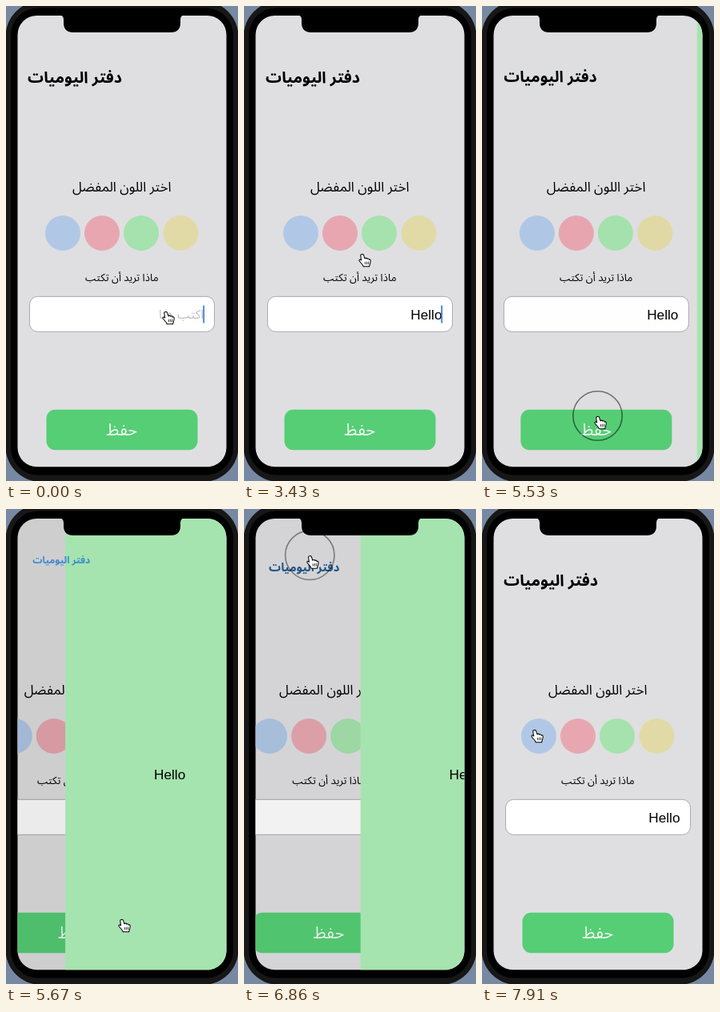
An HTML page for the animation above (8000 ms loop, 290 px wide and 594 px high).

```html
<!DOCTYPE html>
<html lang="ar">
<head>
<meta charset="utf-8">
<title>دفتر اليوميات</title>
<style>
  html, body { margin: 0; width: 100%; height: 100%; overflow: hidden; background: #7788a2; }
  svg { display: block; width: 290px; height: 594px; --k: 1; --kb: 1; }
  .ar { font-family: "Noto Sans Arabic", "Noto Sans", "DejaVu Sans", sans-serif; font-weight: 500; font-size: calc(var(--k) * var(--s) * 1px); }
  .bold { font-weight: 700; font-size: calc(var(--kb) * var(--s) * 1px); }
  .en { font: 17.2px "Liberation Sans", Arial, sans-serif; }
  .mid { text-anchor: middle; }
  .end { text-anchor: end; }
</style>
</head>
<body>
<svg viewBox="0 0 290 594">
  <defs>
    <clipPath id="screen"><rect x="14.5" y="12" width="261" height="564.3" rx="24"/></clipPath>
  </defs>
  <rect x="-.5" y="-6" width="291" height="601" rx="44" fill="#171717"/>
  <rect x="6" y="2.5" width="278" height="584" rx="34"/>

  <g clip-path="url(#screen)">
    <rect width="290" height="594" fill="#dfdfe1"/>
    <g id="form">
      <text class="ar mid" style="--s:19.5" x="144.8" y="232">اختر اللون المفضل</text>
      <circle cx="71" cy="284" r="22" fill="#b0c8e6"/>
      <circle cx="120" cy="284" r="22" fill="#e8a7b0"/>
      <circle cx="169" cy="284" r="22" fill="#a5e2ad"/>
      <circle cx="218.5" cy="284" r="22" fill="#e1daa6"/>
      <text class="ar mid" style="--s:15" x="144.8" y="344">ماذا تريد أن تكتب</text>
      <rect x="29.5" y="363.3" width="231" height="44" rx="10" fill="#fff" stroke="#a9a9ad"/>
      <text id="hint" class="ar end" style="--s:18" x="247" y="391" fill="#bebec2">اكتب هنا</text>
      <text id="typed" class="en end" x="247.5" y="392"></text>
      <rect id="caret" x="246.3" y="374.5" width="1.8" height="22" fill="#3c7fe0"/>
      <rect x="50.5" y="504.7" width="189" height="50.5" rx="11" fill="#55ce75"/>
      <text class="ar mid" style="--s:23.5" x="144.8" y="536.5" fill="#f4fbf5">حفظ</text>
    </g>
    <rect id="dim" width="290" height="594"/>
    <g id="note">
      <rect x="14.5" y="12" width="262" height="565" fill="#a6e4af"/>
      <text class="en mid" x="145" y="338">Hello</text>
    </g>
    <g id="nav">
      <text id="title" class="ar bold" style="--s:23.7">دفتر اليوميات</text>
      <text id="back" class="ar" style="--s:23.7" fill="#2480ee">دفتر اليوميات</text>
    </g>
    <path id="chevron" d="M29 51L23.5 56.3L29 61.6" fill="none" stroke="#2480ee" stroke-width="2" stroke-linecap="round" stroke-linejoin="round"/>
  </g>
  <path d="M67 11H223Q218 12 218 17V21Q218 33 206 33H84Q72 33 72 21V17Q72 12 67 11Z"/>

  <g id="hand">
    <circle id="ring" cx="-3.5" cy="-8.5" r="30.7" fill="none" stroke="#000" stroke-width="1.6"/>
    <g transform="scale(.87)">
      <path d="M-4.5-8.5C-3-9.5-2-8.5-1.5-7L0-2.5C1-3.8 3-3.5 3.2-2C4.5-3 6-2.5 6-1C7.5-1.8 8.5-.8 8.3 1C8.3 4 7 5 6.5 9L-2 9C-2.5 6-6 4-8 .5C-8.5-1.2-6.5-1.8-5 0L-6-6.5C-6.3-7.6-5.5-8.4-4.5-8.5Z" fill="#fff" stroke="#000" stroke-width="1.2" stroke-linejoin="round"/>
      <path d="M.3 2.2L.8 6M2.8 2L3.1 6M5.2 1.8L5.3 5.8" stroke="#000" stroke-width=".9"/>
    </g>
  </g>
</svg>
<script>
const LOOP = 8000;
const $ = id => document.getElementById(id);
const set = (id, name, value) => $(id).setAttribute(name, value);
const clamp = v => Math.max(0, Math.min(1, v));
const within = (t, [from, to]) => t >= from && t < to;

// Bring whichever Arabic font is installed to the same width per em.
const pen = document.createElement('canvas').getContext('2d');
function emScale(weight, ems) {
  pen.font = `${weight} 100px "Noto Sans Arabic", "Noto Sans", "DejaVu Sans", sans-serif`;
  return ems * 100 / pen.measureText('دفتر اليوميات').width;
}
const svgStyle = document.querySelector('svg').style;
svgStyle.setProperty('--k', emScale(500, 4.75));
svgStyle.setProperty('--kb', emScale(700, 4.98));

const PUSH = 5517, POP = 6769;
const keys = [1190, 1330, 1610, 2030, 2310];
const caretOff = [[910, 1190], [2900, 3300], [3900, 4480], [PUSH, LOOP]];
// press, release
const clicks = [[140, 280], [4480, 4690], [5250, 5390], [6650, 6700]];
// time, x, y
const route = [
  [0, 203, 390], [2800, 203, 390], [3430, 151, 318], [3640, 147, 313],
  [4410, 174, 310], [4760, 174, 310], [5200, 148, 521], [5670, 148, 521],
  [6300, 60, 104], [6370, 52, 79], [6510, 84, 61], [6800, 84, 61],
  [7000, 92, 85], [7420, 88, 283], [7560, 69, 284], [LOOP, 69, 284]
];

// Critically damped spring from 0 to 1.
function spring(ms) {
  const u = Math.max(0, ms) * 0.0183;
  return 1 - (1 + u) * Math.exp(-u);
}

function handAt(t) {
  const i = route.findIndex(stop => stop[0] > t);
  const [t0, x0, y0] = route[i - 1], [t1, x1, y1] = route[i];
  const u = (t - t0) / (t1 - t0), e = u * u * (3 - 2 * u);
  return [x0 + (x1 - x0) * e, y0 + (y1 - y0) * e];
}

function ringAlpha(t) {
  const click = clicks.find(([down, up]) => within(t, [down, up + 280]));
  return click ? clamp(1 - (t - click[1]) / 280) : 0;
}

function draw(t) {
  const p = spring(t - PUSH) - spring(t - POP);
  set('form', 'transform', `translate(${-78 * p} 0)`);
  set('dim', 'opacity', 0.1 * p);
  set('note', 'transform', `translate(${261.5 * (1 - p)} 0)`);

  set('nav', 'transform', `translate(${27 + 8 * p} ${96.3 - 36.5 * p}) scale(${1 - 0.502 * p})`);
  const blue = clamp(p * 1.3);
  set('title', 'fill', `rgb(${50 * blue} ${130 * blue} ${205 * blue})`);
  set('title', 'opacity', 1 - p ** 8);
  set('back', 'opacity', p ** 8);
  set('chevron', 'opacity', clamp((p - 0.8) * 5));

  const count = keys.filter(k => t >= k).length;
  $('typed').textContent = 'Hello'.slice(0, count);
  set('hint', 'opacity', count ? 0 : 1);
  set('caret', 'opacity', caretOff.some(span => within(t, span)) ? 0 : 1);

  // The pointer hides while typing.
  set('hand', 'opacity', within(t, [1190, 2800]) ? 0 : 1);
  set('hand', 'transform', `translate(${handAt(t)})`);
  set('ring', 'opacity', ringAlpha(t));
}

const start = performance.now();
function tick() {
  draw((performance.now() - start) % LOOP);
  requestAnimationFrame(tick);
}
tick();
</script>
</body>
</html>
```
